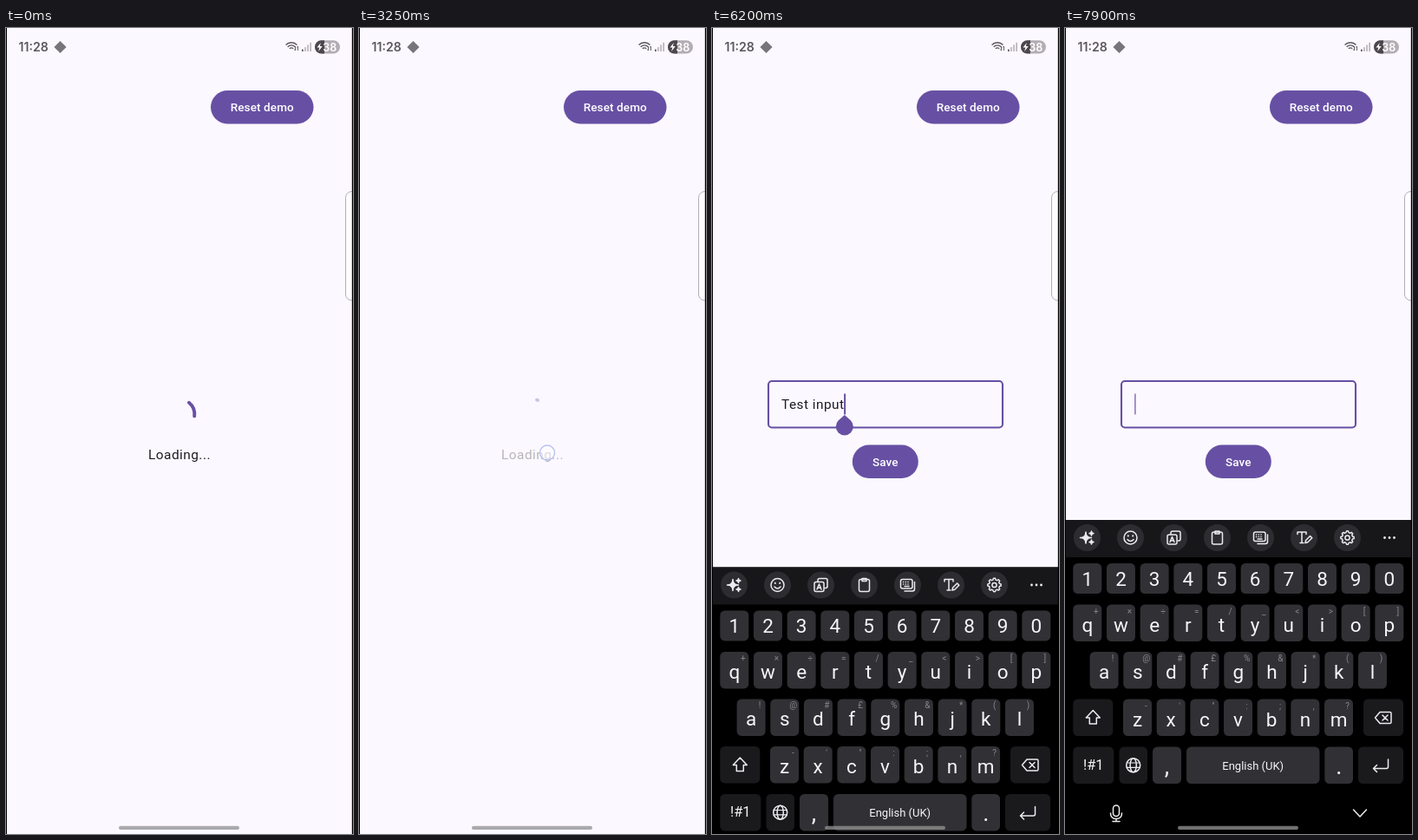
An HTML page for the animation above (8 s loop, 400 px wide and 929 px high).

```html
<!DOCTYPE html>
<html lang="en">
<head>
<meta charset="utf-8">
<title>Loading states demo</title>
<style>
html, body { margin: 0; width: 100%; height: 100%; overflow: hidden; background: #fcf8ff; }
svg { display: block; width: 100vw; height: 100vh; font-family: Roboto, sans-serif; }
text { white-space: pre; }
.body { font-size: 15.4px; letter-spacing: .48px; fill: #1d1b20; }
.label { font-size: 13.5px; font-weight: 500; letter-spacing: .1px; fill: #fff; }
.mid { text-anchor: middle; }
.key { font-size: 22.5px; fill: #f6f6f8; text-anchor: middle; }
.hint { font-size: 10px; fill: #85858b; text-anchor: middle; }
.icon { fill: none; stroke: #ececf0; stroke-width: 1.5; stroke-linecap: round; stroke-linejoin: round; }
</style>
</head>
<body>
<svg id="stage" viewBox="0 0 400 929" preserveAspectRatio="none"></svg>
<script>
const LOOP = 8000, PURPLE = '#6750a4', RED = '#b3261e';
const FAIL = 1750, RETRY = 3100, READY = 4800, FOCUS = 5840, ERASE = 6650;
const WORDS = 'Test input';
const PITCH = 38.67;

const rect = (x, y, w, h, r, fill, extra = '') =>
  `<rect x="${x}" y="${y}" width="${w}" height="${h}" rx="${r}" fill="${fill}" ${extra}/>`;
const text = (x, y, cls, s, extra = '') => `<text x="${x}" y="${y}" class="${cls}" ${extra}>${s}</text>`;
const icon = (x, y, inner) => `<g class="icon" transform="translate(${x} ${y})">${inner}</g>`;
const path = (d, extra = '') => `<path d="${d}" ${extra}/>`;
const button = (x, y, w, fill, s) =>
  rect(x, y, w, 38.5, 19.25, fill) + text(x + w / 2, y + 24, 'label mid', s);
const esc = c => ({ '&': '&amp;', '<': '&lt;', '>': '&gt;' }[c] || c);

function statusBar() {
  const arcs = [3, 6, 9].map(r =>
    path(`M${-r * .72} ${-r * .72}A${r} ${r} 0 0 1 ${r * .72} ${-r * .72}`)).join('');
  const bars = [0, 1, 2, 3].map(i =>
    rect(341 + i * 3.1, 24.5 - i * 2.6, 1.7, 2.5 + i * 2.6, .6, i ? '#b9b4bb' : '#58555a')).join('');
  return text(14.5, 27.2, '', '11:28', 'font-family="Inter, sans-serif" font-size="14.2" font-weight="600" fill="#5b585d"')
    + rect(57.5, 17, 10, 10, 0, '#77747a', 'transform="rotate(45 62.5 22)"')
    + `<g transform="translate(329 26)" fill="none" stroke="#5b585d" stroke-width="1.4">${arcs}
       <path d="M4.5-5v5m-1.5-1.5l1.5 1.5M7.500 0v-5m-1.500 1.500l1.500-1.500" stroke-width=".9"/></g>`
    + bars
    + '<clipPath id="pill"><rect x="356" y="14.300" width="29" height="15.200" rx="7.600"/></clipPath>'
    + `<g clip-path="url(#pill)">${rect(356, 14, 29, 16, 0, '#b3adb4')}${rect(356, 14, 11, 16, 0, '#4b474d')}</g>`
    + path('M362.800 17l-4.300 5.600h2.800l-1.100 4.400 4.500-5.900h-2.900z', 'fill="#fff"')
    + text(373.200, 26.500, 'mid', '38', 'font-family="Inter, sans-serif" font-size="12.500" font-weight="600" fill="#fff"');
}

function gear() {
  let d = '';
  for (let i = 0; i < 48; i++) {
    const a = i / 48 * 2 * Math.PI, r = 6.9 + Math.max(-.8, Math.min(.8, 1.7 * Math.cos(8 * a)));
    d += (i ? 'L' : 'M') + (r * Math.cos(a)).toFixed(2) + ' ' + (r * Math.sin(a)).toFixed(2);
  }
  return path(d + 'z') + '<circle r="2.6"/>';
}

function toolbar() {
  const star = (x, y, r) => path(
    `M${x} ${y - r}Q${x} ${y} ${x + r} ${y}Q${x} ${y} ${x} ${y + r}Q${x} ${y} ${x - r} ${y}Q${x} ${y} ${x} ${y - r}z`,
    'fill="#ececf0"');
  const icons = [
    star(-1.5, 0, 6.5) + star(5, -5, 2.5) + star(5, 5, 2.5),
    '<circle r="7.500"/>' + path('M-3.500 2q3.500 4 7 0') + path('M-2.700-2.200v.2M2.700-2.200v.2', 'stroke-width="2"'),
    path('M-3.500-4v-1.500q0-2 2-2h7q2 0 2 2v7q0 2-2 2h-1')
      + '<rect x="-7.500" y="-3.500" width="11" height="11" rx="2"/>' + path('M-4.500 5l2.500-6 2.500 6M-3.600 3.200h3.200'),
    '<rect x="-6" y="-6.500" width="12" height="14" rx="2"/>' + path('M-2.500-7.500h5v3h-5z'),
    '<rect x="-8" y="-6.500" width="13.500" height="10.500" rx="2"/>'
      + path('M8-3.500v8q0 2.500-2.500 2.500h-9') + path('M-5-3.500h8M-5-1h8', 'stroke-dasharray=".2 2.500"') + path('M-3.500 1.500h5'),
    path('M-7.500-4v-2.500h10v2.500M-2.500-6.500v12.500M-4.500 6h4') + path('M1.500 6l.6-3 5-5 2.200 2.200-5 5z'),
    gear()
  ];
  return rect(0, 567, 400, 43, 0, '#17171a') + icons.map((s, i) => {
    const x = 25.5 + i * 50;
    return `<circle cx="${x}" cy="587.500" r="15.500" fill="#2d2d31"/>` + icon(x, 587.5, s);
  }).join('') + [-5.5, 0, 5.5].map(d => `<circle cx="${374 + d}" cy="587.500" r="1.400" fill="#ececf0"/>`).join('');
}

function keyboard() {
  const LIGHT = '#303035', DARK = '#1a1a1d';
  const cap = (x, y, w, fill, h = 42.5) => rect(x, y, w, h, 5.5, fill);
  const row = (keys, hints, x, y, h, base) => [...keys].map((c, i) => {
    const kx = x + i * PITCH;
    return cap(kx, y, 33, LIGHT, h) + text(kx + 16.5, base, 'key', c)
      + (hints ? text(kx + 26.5, y + 11, 'hint', esc(hints[i])) : '');
  }).join('');
  return rect(0, 567, 400, 400, 0, '#000') + toolbar()
    + row('1234567890', '', 9.3, 617, 35, 642.7)
    + row('qwertyuiop', '+×÷=/_<>[]', 9.3, 664.5, 42.5, 695.5)
    + row('asdfghjkl', '!@#£%&*()', 28.6, 719, 42.5, 750)
    + row('zxcvbnm', '-\'":;,?', 67, 773.5, 42.5, 804.5)
    + cap(9.3, 773.5, 46, DARK)
    + icon(32.3, 795, path('M0-8.500l8 8.500h-4v7h-8v-7h-4z'))
    + cap(344, 773.5, 46, DARK)
    + rect(344, 773.5, 46, 42.5, 5.5, '#55555c', 'id="press"')
    + icon(367, 795, path('M-9.500 0l5.500-6.500h11.500q1.500 0 1.500 1.500v10q0 1.500-1.500 1.500h-11.500zM-1-3l6 6M5-3l-6 6'))
    + cap(9.3, 828.5, 47, DARK) + text(32.8, 855, 'key', '!#1', 'style="font-size:16.500px"')
    + cap(62.5, 828.5, 32.5, DARK)
    + icon(78.7, 849.7, '<circle r="8"/><ellipse rx="3.600" ry="8"/>' + path('M-7.500-2.700h15M-7.500 2.700h15', 'stroke-width="1.200"'))
    + cap(101, 828.5, 33, LIGHT) + text(117.5, 860, 'key', ',', 'style="font-size:27px"')
    + cap(140, 828.5, 153.5, LIGHT) + text(216.7, 854.5, 'key', 'English (UK)', 'style="font-size:13px"')
    + cap(299.3, 828.5, 32.7, LIGHT) + text(315.7, 860, 'key', '.', 'style="font-size:27px"')
    + cap(338, 828.5, 52, DARK)
    + icon(364, 850, path('M8.500-7v8.500q0 2-2 2h-15M-4.500-.5l-4 4 4 4'))
    + icon(59, 905, '<rect x="-3.500" y="-9" width="7" height="12.500" rx="3.500"/>' + path('M-6.500 0q0 6.500 6.500 6.500t6.500-6.500M0 6.500v3M-4 9.500h8'))
    + icon(340, 905, path('M-7.500-4l7.500 8 7.500-8'));
}

const stage = document.getElementById('stage');
stage.innerHTML = rect(0, 0, 400, 929, 0, '#fcf8ff')
  + `<g id="failed">${rect(0, 0, 400, 929, 0, '#f7dcd9')}${text(200, 439.3, 'body mid', 'Loading failed :(')}${button(158.3, 465, 82.6, RED, 'Retry!')}</g>`
  + `<g id="loading"><path id="arc" fill="none" stroke="${PURPLE}" stroke-width="3.850" stroke-linecap="round"/>${text(200, 497, 'body mid', 'Loading...')}</g>`
  + `<g id="form">${rect(65, 407, 270, 53.5, 4, 'none', 'id="box"')}${text(80, 439.3, 'body', '', 'id="words"')}
     ${rect(0, 421.5, 2, 24, 0, PURPLE, 'id="caret"')}${button(161.8, 480.5, 76, PURPLE, 'Save')}
     <path id="handle" d="M0 446l7 6.300A10 10 0 1 1-7 452.300z" fill="${PURPLE}"/></g>`
  + button(236, 72, 118.5, PURPLE, 'Reset demo')
  + statusBar()
  + `<circle id="tap" r="8.500" fill="#fff" fill-opacity=".5" stroke="#b3bfee" stroke-width="1.300"/>`
  + `<g id="keys">${keyboard()}</g>`
  + rect(391.5, 188.5, 20, 125.5, 7, '#fff', 'fill-opacity=".45" stroke="#b2adb8"')
  + rect(130, 919.8, 139, 4.2, 2.1, '#929292', 'opacity=".77"')
  + rect(0, 0, 1, 929, 0, '#000') + rect(398.8, 0, 1.2, 929, 0, '#000');

const el = Object.fromEntries([...stage.querySelectorAll('[id]')].map(n => [n.id, n]));
const set = (n, attrs) => { for (const k in attrs) n.setAttribute(k, attrs[k]); };
const clamp = (v, a = 0, b = 1) => Math.min(b, Math.max(a, v));

// cubic-bezier(.4, 0, .2, 1)
function ease(x) {
  if (x <= 0) return 0;
  if (x >= 1) return 1;
  let lo = 0, hi = 1, s = .5;
  for (let i = 0; i < 22; i++) {
    s = (lo + hi) / 2;
    if (1.2 * s * (1 - s) ** 2 + .6 * s * s * (1 - s) + s ** 3 < x) lo = s; else hi = s;
  }
  return 3 * s * s * (1 - s) + s ** 3;
}
const fadeIn = (t, at) => ease((t - at - 90) / 220);
const fadeOut = (t, at) => 1 - ease((t - at) / 90);

function spinner(ms) {
  const turn = Math.floor(ms / 1332), p = ms - turn * 1332;
  const head = 290 * ease(p / 666), tail = 290 * ease((p - 666) / 666);
  const a = -90 + turn * 216 + p / 1332 * 286 + tail + 5.7;
  const sweep = Math.max(.1, head - tail);
  const at = deg => {
    const r = deg * Math.PI / 180;
    return `${(200 + 17.3 * Math.cos(r)).toFixed(2)} ${(445.2 + 17.3 * Math.sin(r)).toFixed(2)}`;
  };
  return `M${at(a)}A17.3 17.3 0 ${sweep > 180 ? 1 : 0} 1 ${at(a + sweep)}`;
}

function drawForm(t) {
  let left = 10, edit = FOCUS;
  if (t >= ERASE) { left = 9; edit = ERASE; }
  if (t >= 6900) {
    const n = Math.min(8, Math.floor((t - 6900) / 80));
    left = 8 - n;
    edit = 6900 + n * 80;
  }
  el.words.textContent = WORDS.slice(0, left);
  const x = 80.5 + (left ? el.words.getComputedTextLength() : 0);
  const from = Math.max(80.3, x - 1);
  const blink = t >= FOCUS && (t - edit) % 1000 < 500;
  set(el.caret, { x: from, width: x + 1 - from, opacity: blink ? 1 : 0 });
  set(el.handle, {
    transform: `translate(${x - .3} 0)`,
    opacity: t >= 5900 && t < ERASE + 50 ? 1 : 0
  });
  const f = clamp((t - FOCUS) / 150), mix = (a, b) => Math.round(a + (b - a) * f);
  set(el.box, {
    stroke: `rgb(${mix(121, 103)},${mix(116, 80)},${mix(126, 164)})`,
    'stroke-width': 1.1 + f
  });
}

function drawTap(t) {
  const [x, y, start, end] = t < READY ? [217, 489.5, RETRY, 3400] : [273, 455, 5740, 5920];
  set(el.tap, { cx: x, cy: y, opacity: t < start ? 0 : clamp((end - t) / 150) });
}

function render(t) {
  const first = t < RETRY;
  set(el.failed, { opacity: first ? fadeIn(t, FAIL) : fadeOut(t, RETRY) });
  set(el.loading, { opacity: first ? fadeOut(t, FAIL) : fadeIn(t, RETRY) * fadeOut(t, READY) });
  set(el.form, { opacity: fadeIn(t, READY) });
  set(el.arc, { d: spinner(first ? t + 155 : Math.max(0, t - 3200)) });
  drawForm(t);
  drawTap(t);
  const rise = (1 - clamp((t - 6000) / 450)) ** 3.2;
  set(el.keys, { transform: `translate(0 ${362 * rise})` });
  set(el.press, { opacity: t < ERASE ? 0 : .6 * clamp((7900 - t) / 200) });
}

const t0 = performance.now();
function tick() {
  render((performance.now() - t0) % LOOP);
  requestAnimationFrame(tick);
}
tick();
</script>
</body>
</html>
```
